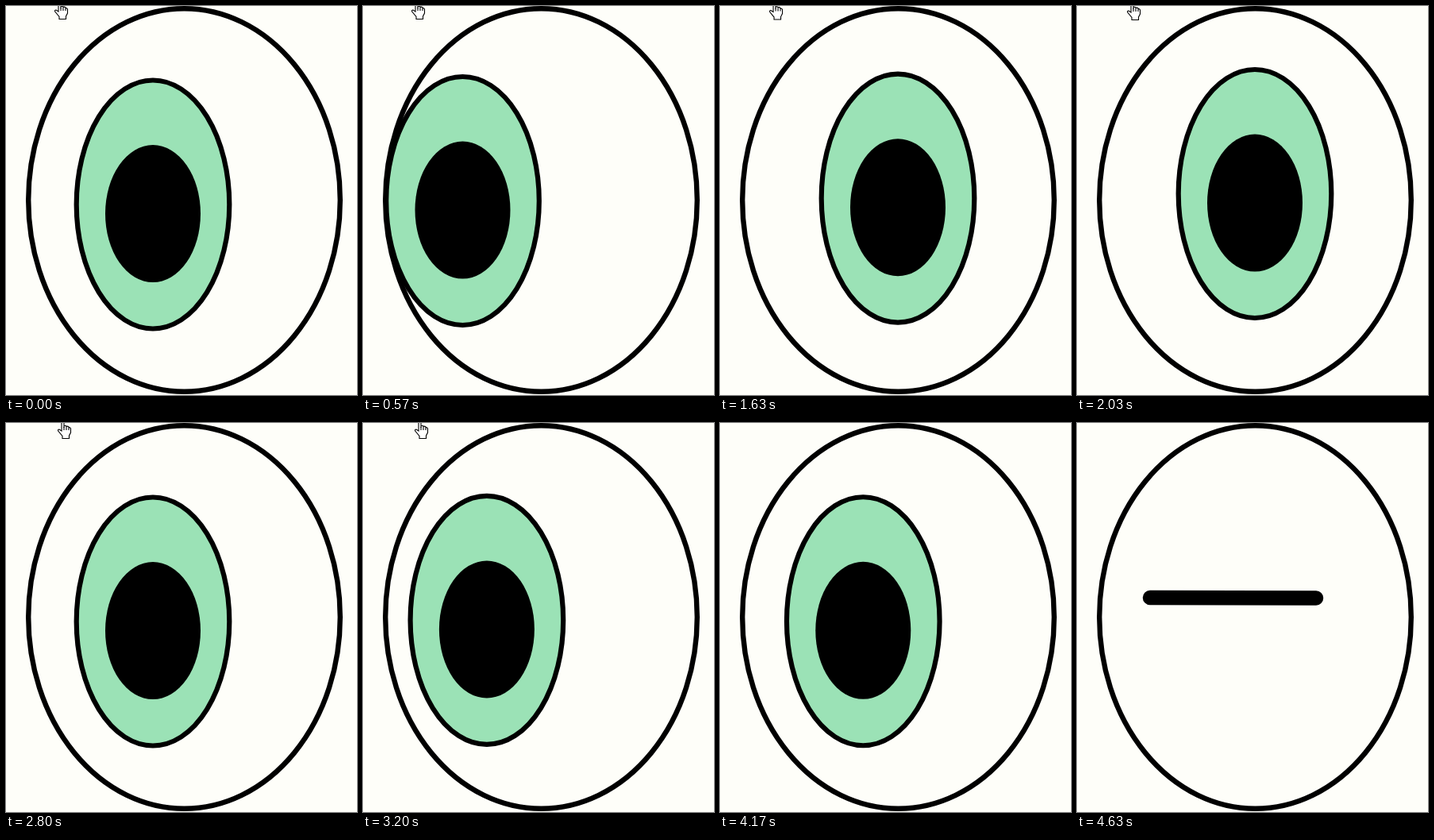
Write an HTML page with a canvas that moves like this. It is 442 by 490 pixels and loops after 4.66 s.

```html
<!DOCTYPE html>
<html lang="en">
<head>
<meta charset="utf-8">
<title>Eye</title>
<style>
  html, body { margin: 0; width: 100%; height: 100%; overflow: hidden; background: #fefef9; }
  canvas { display: block; }
</style>
</head>
<body>
<canvas id="stage" width="442" height="490"></canvas>
<script>
const ctx = document.getElementById('stage').getContext('2d');
const LOOP = 4660, BLINK_AT = 4470, CURSOR_GONE = 3220;
const PAPER = '#fefef9', INK = '#000', GREEN = '#9be2b6';

// [time, x, y]
const gaze = [
  [0, 185, 250], [570, 125.5, 245.5], [1200, 224, 248.5], [2030, 224, 236.5],
  [2800, 185, 250], [3600, 127, 246.8], [4300, 185, 250], [LOOP, 185, 250]
];
const pointer = [
  [0, 61, -5], [1200, 61, -5], [2030, 63, -4], [2800, 65, -2], [LOOP, 65, -2]
];

function poseAt(track, time) {
  const i = track.findIndex(key => key[0] > time);
  const [t0, x0, y0] = track[i - 1];
  const [t1, x1, y1] = track[i];
  const u = (1 - Math.cos(Math.PI * (time - t0) / (t1 - t0))) / 2;
  return [x0 + (x1 - x0) * u, y0 + (y1 - y0) * u];
}

function oval(x, y, rx, ry, fill, lineWidth) {
  ctx.beginPath();
  ctx.ellipse(x, y, rx, ry, 0, 0, Math.PI * 2);
  ctx.fillStyle = fill;
  ctx.fill();
  if (lineWidth) {
    ctx.lineWidth = lineWidth;
    ctx.stroke();
  }
}

function drawIris(x, y) {
  oval(x, y, 96.3, 156.5, GREEN, 6.2);
  oval(x, y + 11.6, 60, 86.5, INK);
}

function drawClosedLid() {
  ctx.lineWidth = 18.5;
  ctx.lineCap = 'round';
  ctx.beginPath();
  ctx.moveTo(92, 220);
  ctx.lineTo(301, 220.5);
  ctx.stroke();
}

const hand = new Path2D(
  'M5 12V2Q5 .5 6.5 .5T8 2V8V6Q9.5 4.5 11 6V8V6.5Q12.5 5.5 14 7V9V8' +
  'Q15.5 7 16.5 9V14L14.5 18V21.5H6V18.5L.7 12Q0 10 2 10Z');
const knuckles = new Path2D('M8 7V11M11 8V11M14 9V11');

function drawPointer(x, y) {
  ctx.save();
  ctx.translate(x, y);
  ctx.lineWidth = 1.1;
  ctx.fillStyle = '#fff';
  ctx.fill(hand);
  ctx.stroke(hand);
  ctx.stroke(knuckles);
  ctx.restore();
}

function draw(time) {
  ctx.fillStyle = PAPER;
  ctx.fillRect(0, 0, 442, 490);
  ctx.strokeStyle = INK;
  oval(224.5, 244.5, 196.3, 241.3, PAPER, 6.4);
  if (time < BLINK_AT) drawIris(...poseAt(gaze, time));
  else drawClosedLid();
  if (time < CURSOR_GONE) drawPointer(...poseAt(pointer, time));
}

const start = performance.now();
function tick() {
  draw((performance.now() - start) % LOOP);
  requestAnimationFrame(tick);
}
tick();
</script>
</body>
</html>
```
